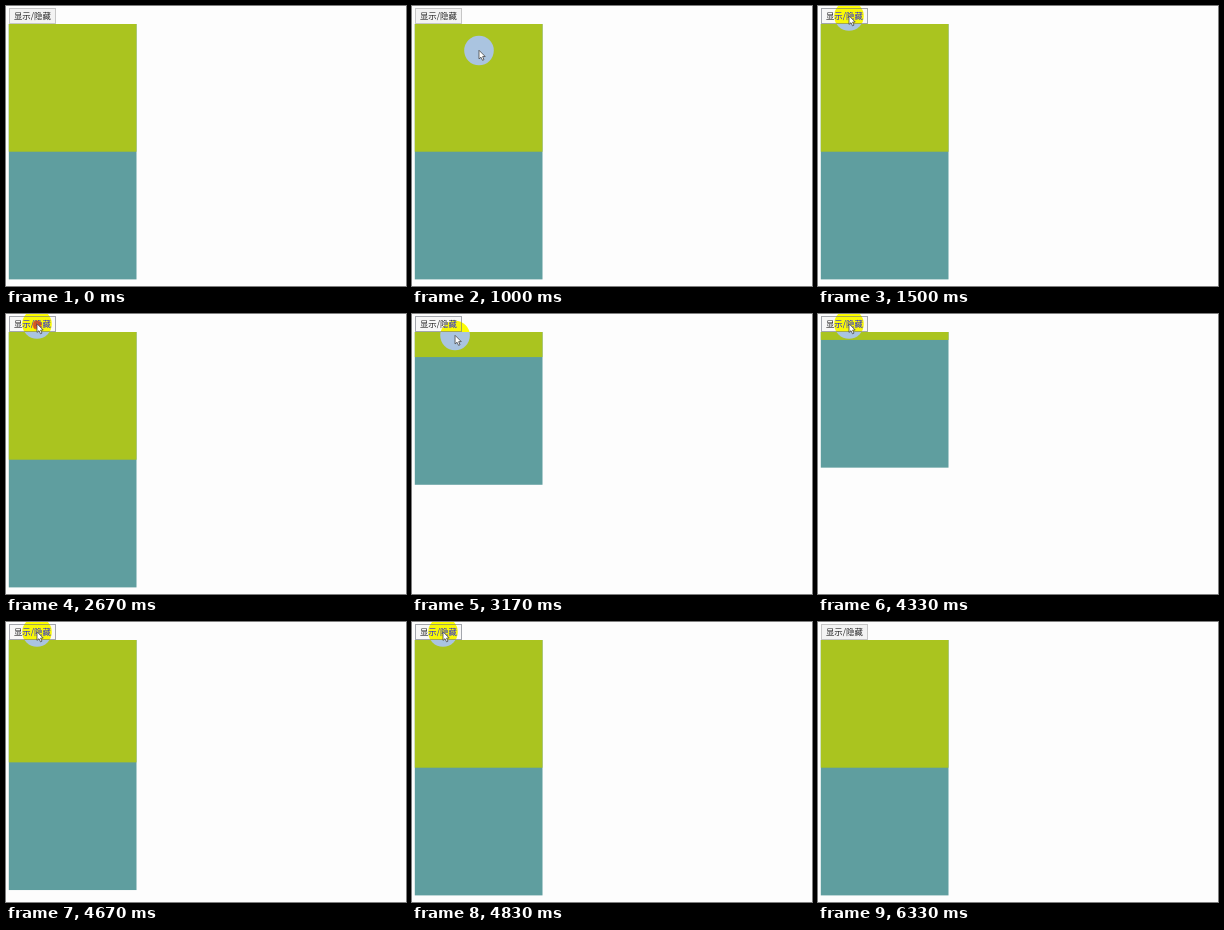
An HTML page with a canvas for the animation above (7340 ms loop, 400 by 280 pixels).

```html
<!DOCTYPE html>
<html lang="zh">
<head>
<meta charset="utf-8">
<style>
  html, body { margin: 0; width: 100%; height: 100%; overflow: hidden; background: #fdfdfd; }
  canvas { display: block; width: 400px; height: 280px; }
</style>
</head>
<body>
<canvas id="stage" width="400" height="280"></canvas>
<script>
const ctx = document.getElementById('stage').getContext('2d');
const LOOP = 7340, STEP = 1000 / 6;
const LEFT = 2.8, TOP = 18, SIZE = 127.7;
const SLIDE = 500, CLOSE_AT = 2916, OPEN_AT = 4295;

const ENTRY = { x: 163, y: 247 }, INSIDE = { x: 67, y: 44.5 }, BUTTON = { x: 31, y: 10 };
const ASIDE = { x: 55, y: 33 }, EXIT = { x: 107, y: 103 };
const moves = [
  { start: 160, end: 1000, to: INSIDE },
  { start: 1000, end: 1250, to: BUTTON },
  { start: 2830, end: 3500, to: ASIDE },
  { start: 3670, end: 4160, to: BUTTON },
  { start: 6000, end: 6160, to: EXIT }
];

const between = (t, from, to) => t >= from && t < to;
const progress = (t, start, end) => Math.min(1, Math.max(0, (t - start) / (end - start)));
const mix = (a, b, p) => a + (b - a) * p;

// CSS "ease": cubic-bezier(.25, .1, .25, 1)
function ease(p) {
  const bezier = (a, b, u) => 3 * a * u * (1 - u) ** 2 + 3 * b * u * u * (1 - u) + u ** 3;
  let low = 0, high = 1;
  for (let i = 0; i < 20; i++) {
    const mid = (low + high) / 2;
    if (bezier(.25, .25, mid) < p) low = mid; else high = mid;
  }
  return bezier(.1, 1, low);
}

const slide = (t, start) => ease(progress(t, start, start + SLIDE));

function pointerAt(t) {
  return moves.reduce((from, { start, end, to }) => {
    const p = progress(t, start, end);
    return { x: mix(from.x, to.x, p), y: mix(from.y, to.y, p) };
  }, ENTRY);
}

function box(color, x, y, w, h) {
  ctx.fillStyle = color;
  ctx.fillRect(x, y, w, h);
}

function disc(color, x, y, r) {
  ctx.fillStyle = color;
  ctx.beginPath();
  ctx.arc(x, y, r, 0, Math.PI * 2);
  ctx.fill();
}

function drawButton(active) {
  box(active ? '#f8f8f8' : '#f3f3f3', 3, 2, 47, 15.5);
  ctx.strokeStyle = active ? '#a3a6ac' : '#c6c6c6';
  ctx.lineWidth = 1;
  ctx.strokeRect(3.5, 2.5, 46, 15);
  ctx.fillStyle = '#222';
  ctx.font = '8.4px "Noto Sans CJK SC", "Noto Sans CJK", sans-serif';
  ctx.fillText('显示/隐藏', 8, 13.3);
}

function drawPointer({ x, y }, clicking) {
  ctx.globalCompositeOperation = 'difference';
  disc('#00f', x, y, 14.8);
  ctx.globalCompositeOperation = 'source-over';
  if (clicking) disc('rgba(225, 40, 20, .65)', x, y + 1, 4.5);

  const arrow = new Path2D('M0 0V8.6L2 6.9L3.5 10L5 9.3L3.6 6.3L6.2 6.2Z');
  ctx.save();
  ctx.translate(x, y - .2);
  ctx.fillStyle = '#fff';
  ctx.fill(arrow);
  ctx.strokeStyle = '#444';
  ctx.lineWidth = .8;
  ctx.stroke(arrow);
  ctx.restore();
}

function draw(t) {
  const height = SIZE * (1 - slide(t, CLOSE_AT) + slide(t, OPEN_AT));
  box('#fdfdfd', 0, 0, 400, 280);
  drawButton(between(t, 1330, 6160));
  box('#5f9e9f', LEFT, TOP, SIZE, height + SIZE);
  box('#aac41f', LEFT, TOP, SIZE, height);
  if (between(t, 160, 6330)) {
    const clicking = between(t, 2660, 2830) || between(t, 4160, 4330);
    drawPointer(pointerAt(t), clicking);
  }
}

function tick() {
  const t = performance.now() % LOOP;
  draw(Math.floor((t + 4) / STEP) * STEP);
  requestAnimationFrame(tick);
}
tick();
</script>
</body>
</html>
```
